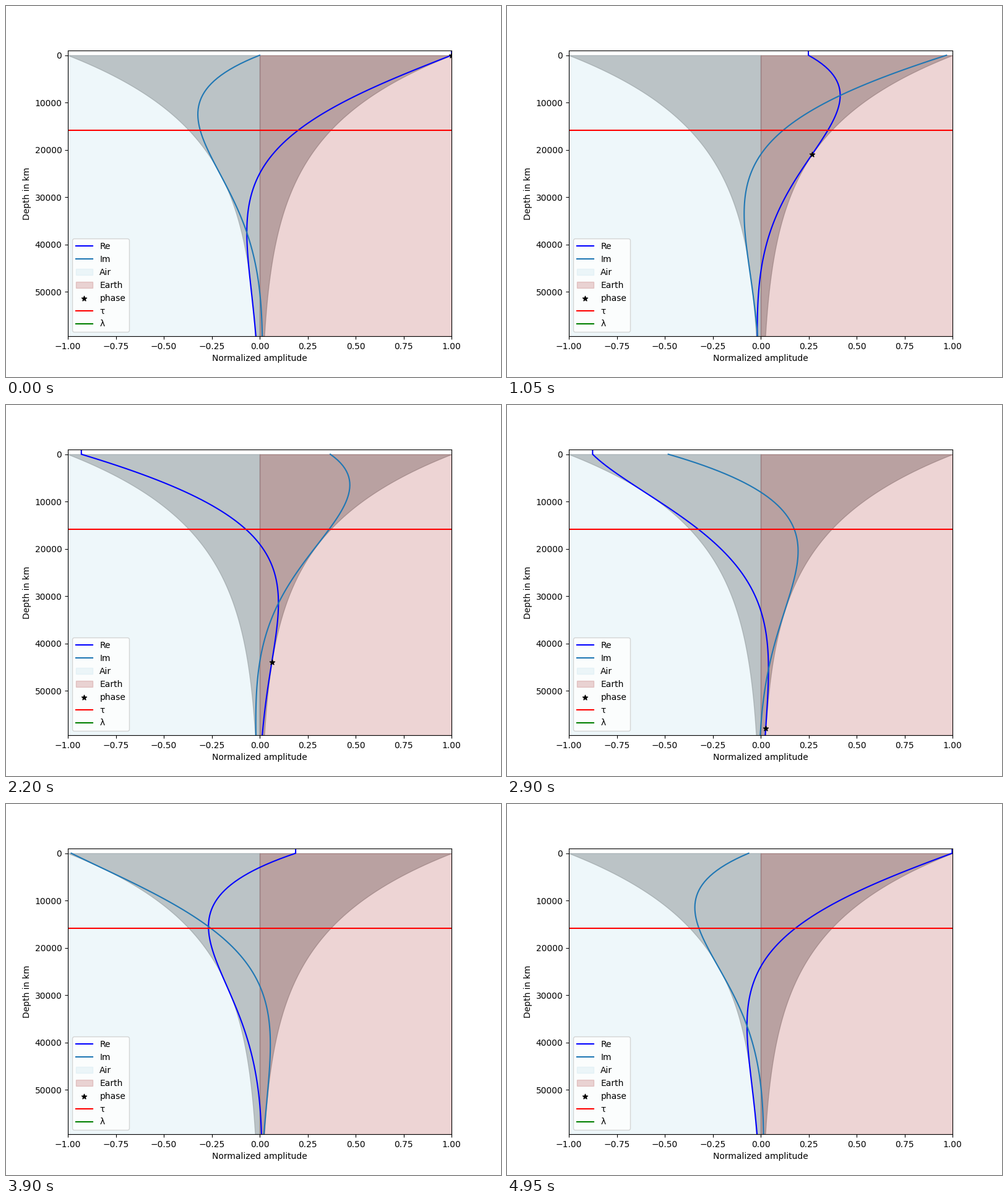
Animation of 800x600 px, one loop 5000 ms. Source, as a matplotlib script:

```python
import numpy as np
import matplotlib.pyplot as plt
from matplotlib.animation import FuncAnimation

FRAMES = 100
INTERVAL = 50
WAVELENGTH = 100_000
SKIN = WAVELENGTH / (2 * np.pi)

depth = np.arange(0, 60_000, 600)
envelope = np.exp(-depth / SKIN)

fig, ax = plt.subplots(figsize=(8, 6), dpi=100)

for side in (-1, 1):
    ax.fill_betweenx(depth, 0, side * envelope, color="gray", alpha=0.5)

re_line, = ax.plot([], [], color="blue", label="Re")
im_line, = ax.plot([], [], color="C0", label="Im")
ax.fill_betweenx(depth, -1, 0, color="lightblue", alpha=0.2, label="Air")
ax.fill_betweenx(depth, 0, 1, color="brown", alpha=0.2, label="Earth")
star = ax.scatter([1], [0], marker="*", color="black", label="phase", zorder=3)
ax.axhline(SKIN, color="red", label="τ")
ax.axhline(WAVELENGTH, color="green", label="λ")

ax.set_xlim(-1, 1)
ax.set_ylim(depth[-1], -1000)
ax.set_xlabel("Normalized amplitude")
ax.set_ylabel("Depth in km")
ax.legend(loc="lower left")


def update(i):
    turn = 2 * np.pi * i / FRAMES
    wave = np.exp(1j * (turn - depth / SKIN)) * envelope
    # Above the surface the real part keeps its surface value.
    re_line.set_data(np.r_[wave.real[0], wave.real], np.r_[-1000, depth])
    im_line.set_data(wave.imag, depth)
    crest = i * WAVELENGTH / FRAMES
    star.set_offsets([[np.exp(-crest / SKIN), crest]])
    return re_line, im_line, star


anim = FuncAnimation(fig, update, frames=FRAMES, interval=INTERVAL,
                     repeat=True, repeat_delay=0, blit=False)
plt.show()
```
